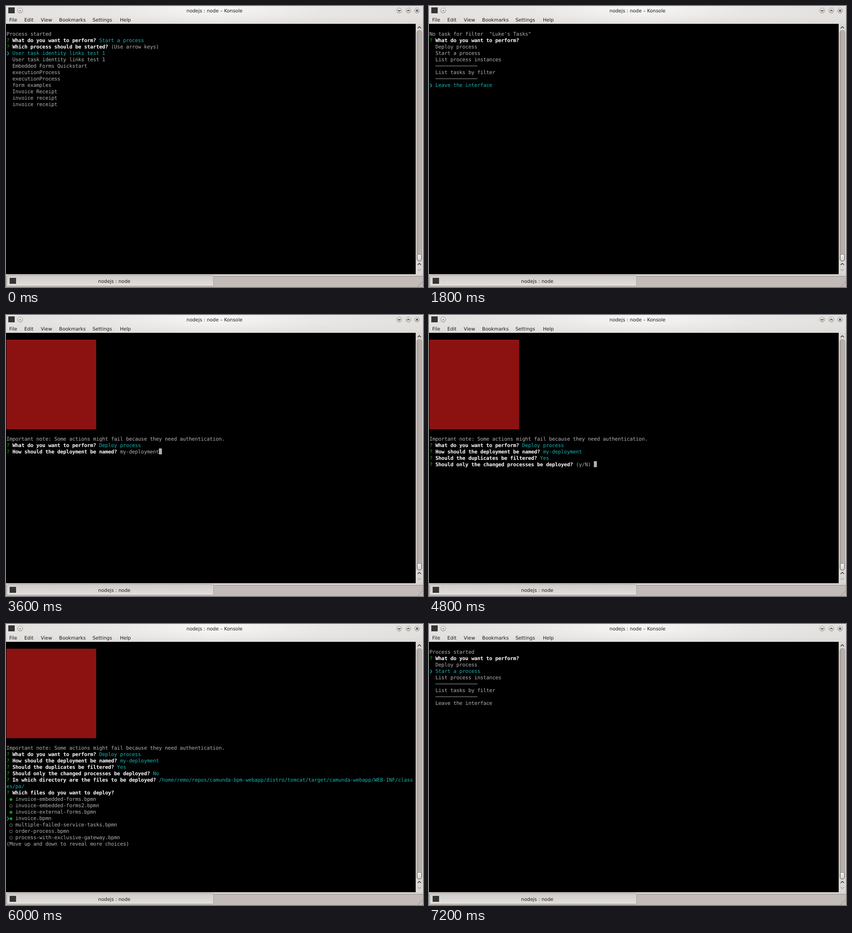
Animation of 911x615 px, one loop 7.8 s. Source, as an HTML page with a canvas:

```html
<!DOCTYPE html>
<html lang="en">
<head>
<meta charset="utf-8">
<title>Terminal session</title>
<style>
html, body { margin: 0; width: 100%; height: 100%; overflow: hidden; background: #000; }
canvas { display: block; }
</style>
</head>
<body>
<canvas id="stage" width="911" height="615"></canvas>
<script>
const ctx = document.getElementById('stage').getContext('2d');
const STEP = 600, CELL = 6.53, ROW = 14;
const GREY = '#b2b2b2', CYAN = '#18b2b2', GREEN = '#18b218', RED = '#8c1212', WHITE = '#fff';
const MONO = '11.2px "DejaVu Sans Mono", monospace';
const SANS = '10.4px "DejaVu Sans", sans-serif';

// A line is a list of [text, colour, bold] runs.
const plain = text => [[text, GREY]];
const ask = (question, answer = '', hint = '') =>
  [['? ', GREEN], [question + ' ', WHITE, true], [answer, CYAN], [hint, GREY]];
const choose = (items, picked) => items.map((item, i) =>
  i === picked ? [['❯ ' + item, CYAN]] : plain('  ' + item));
const check = (name, on, current) =>
  [[current ? '❯' : ' ', CYAN], [on ? '◉' : '○', on ? GREEN : GREY], [' ' + name, GREY]];

const RULE = '─'.repeat(14);
const actions = ['Deploy process', 'Start a process', 'List process instances', RULE,
  'List tasks by filter', RULE, 'Leave the interface'];
const processes = ['User task identity links test 1', 'User task identity links test 1',
  'Embedded Forms Quickstart', 'executionProcess', 'executionProcess', 'form examples',
  'Invoice Receipt', 'invoice receipt', 'invoice receipt'];
const filters = ['My Tasks', 'My Group Tasks', 'Accounting', "Luke's Tasks", "Anna's Tasks",
  "Simon's Tasks", 'All Tasks'];
const path = '/home/remo/repos/camunda-bpm-webapp/distro/tomcat/target/camunda-webapp/WEB-INF/classes/pa/';

const perform = answer => ask('What do you want to perform?', answer);
const started = plain('Process started');
const noTask = plain(`No task for filter  "Luke's Tasks"`);
const whichProcess = 'Which process should be started?';
const whichFilter = ask('For which filter do you want the tasks?');
const named = 'How should the deployment be named?';
const duplicates = 'Should the duplicates be filtered?';
const changed = 'Should only the changed processes be deployed?';
const directory = 'In which directory are the files to be deployed?';

const page = (...lines) => ({ lines: [[], ...lines] });
const deploy = (...lines) => ({
  logo: true,
  lines: [...Array(16).fill([]),
    plain('Important note: Some actions might fail because they need authentication.'), ...lines]
});
const typing = screen => ({ ...screen, cursor: true });

const deploying = perform('Deploy process');
const answers = [deploying, ask(named, 'my-deployment'), ask(duplicates, 'Yes'), ask(changed, 'No')];

const screens = [
  page(started, perform('Start a process'), ask(whichProcess, '', '(Use arrow keys)'),
    ...choose(processes, 0)),
  page(started, perform('List tasks by filter'), whichFilter, ...choose(filters, 3)),
  page(noTask, perform('List tasks by filter'), whichFilter, ...choose(filters, 6)),
  page(noTask, perform(), ...choose(actions, 6)),
  typing({ shell: true,
    lines: [plain('remo@remo-linux:~/repos/camunda-bpm-examples/sdk-js/nodejs$ node index.js ')] }),
  deploy(perform(), ...choose(actions, 0)),
  typing(deploy(deploying, ask(named, '', 'my-deployment'))),
  typing(deploy(...answers.slice(0, 2), ask(duplicates, '', '(Y/n) '))),
  typing(deploy(...answers.slice(0, 3), ask(changed, '', '(y/N) '))),
  typing(deploy(...answers, ask(directory, '', path.slice(0, 85)), plain(path.slice(85)))),
  deploy(...answers, ask(directory, path.slice(0, 85)), [[path.slice(85), CYAN]],
    ask('Which files do you want to deploy?'),
    check('invoice-embedded-forms.bpmn', true),
    check('invoice-embedded-forms2.bpmn'),
    check('invoice-external-forms.bpmn', true),
    check('invoice.bpmn', true, true),
    check('multiple-failed-service-tasks.bpmn'),
    check('order-process.bpmn'),
    check('process-with-exclusive-gateway.bpmn'),
    plain('(Move up and down to reveal more choices)')),
  page(started, perform('Start a process'), ask(whichProcess), ...choose(processes, 6)),
  page(started, perform(), ...choose(actions, 1))
];

function rect(x, y, w, h, fill) {
  ctx.fillStyle = fill;
  ctx.fillRect(x, y, w, h);
}

function box(x, y, w, h, r, fill, stroke) {
  ctx.beginPath();
  ctx.roundRect(x, y, w, h, r);
  ctx.fillStyle = fill;
  ctx.fill();
  ctx.strokeStyle = stroke;
  ctx.lineWidth = 1;
  ctx.stroke();
}

function line(colour, width, ...points) {
  ctx.beginPath();
  for (const [x, y] of points) ctx.lineTo(x, y);
  ctx.strokeStyle = colour;
  ctx.lineWidth = width;
  ctx.stroke();
}

function fade(x0, y0, x1, y1, ...colours) {
  const g = ctx.createLinearGradient(x0, y0, x1, y1);
  colours.forEach((c, i) => g.addColorStop(i / (colours.length - 1), c));
  return g;
}

const chevron = (x, y, dy, size, colour) =>
  line(colour, 1.3, [x - size, y - dy], [x, y + dy], [x + size, y - dy]);

function label(text, x, y, align = 'left') {
  ctx.font = SANS;
  ctx.textAlign = align;
  ctx.fillStyle = '#1d1b1a';
  ctx.fillText(text, x, y);
}

function button(x) {
  box(x - 5.5, 4.5, 11, 11, 5.5, fade(0, 4, 0, 16, '#f6f5f4', '#c9c5c2'), '#9d9895');
}

function drawWindow(program) {
  rect(0, 0, 911, 615, '#dedbd8');
  rect(0, 0, 911, 40, fade(0, 0, 911, 0, '#d8d5d2', '#e2e0de', '#f6f5f5', '#e2e0de', '#d8d5d2'));
  rect(0, 0, 911, 40, fade(0, 0, 0, 40, '#ffffff30', '#dedbd8c0'));
  rect(0, 0, 911, 1, '#f4f3f2');
  rect(5, 3, 14, 13, '#343434');
  button(31);
  rect(30, 9, 2, 2, '#77716e');
  [859, 879, 898].forEach(button);
  chevron(859, 10, 1.3, 2.7, '#3b3836');
  chevron(879, 10, -1.3, 2.7, '#3b3836');
  line('#3b3836', 1.3, [895.7, 7.7], [900.3, 12.3]);
  line('#3b3836', 1.3, [900.3, 7.7], [895.7, 12.3]);
  label(`nodejs : ${program} – Konsole`, 455.5, 14, 'center');
  [['File', 7], ['Edit', 40], ['View', 76], ['Bookmarks', 116], ['Settings', 189], ['Help', 249]]
    .forEach(([name, x]) => label(name, x, 34));

  // Scroll bar
  rect(895, 39, 16, 549, '#d9d6d3');
  box(897.5, 53.5, 11, 505, 5, fade(897, 0, 909, 0, '#a8a19d', '#b5aeaa', '#b8b1ad'), '#a09995');
  box(898.5, 543.5, 9, 14, 3, fade(0, 543, 0, 558, '#f3f2f1', '#d5d1ce'), '#77716d');
  chevron(903, 47, -1.8, 3.7, '#2b2927');
  chevron(903, 565, -1.8, 3.7, '#2b2927');
  chevron(903, 577.5, 1.8, 3.7, '#aaa4a0');

  // Tab bar
  rect(0, 587, 911, 28, '#c2bbb7');
  rect(0, 587, 911, 4, '#d6d2cf');
  rect(454, 591, 457, 1, '#948d89');
  box(1.5, 589.5, 452, 23, 3, fade(0, 589, 0, 613, '#d0cbc8', '#e2dfdd'), '#a39d99');
  line('#f3f1f0', 1, [4, 611.5], [452, 611.5]);
  rect(8, 595, 14, 13, '#343434');
  label(`nodejs : ${program}`, 236.5, 606, 'center');
  line('#8f8885', 1, [899, 615], [911, 603]);
}

function drawTerminal({ lines, logo, cursor }) {
  rect(0, 39, 895, 548, '#000');
  if (logo) rect(1, 54, 196, 196, RED);
  ctx.textAlign = 'left';
  let column;
  lines.forEach((runs, row) => {
    column = 0;
    for (const [text, colour, bold] of runs) {
      ctx.font = (bold ? 'bold ' : '') + MONO;
      ctx.fillStyle = colour;
      for (const char of text) ctx.fillText(char, 1 + CELL * column++, 51 + ROW * row);
    }
  });
  if (cursor) rect(1 + CELL * column, 26 + ROW * lines.length, CELL, 13, GREY);
}

function draw(now) {
  const screen = screens[Math.floor(now / STEP) % screens.length];
  ctx.textRendering = 'geometricPrecision';
  drawWindow(screen.shell ? 'bash' : 'node');
  drawTerminal(screen);
  requestAnimationFrame(draw);
}
requestAnimationFrame(draw);
</script>
</body>
</html>
```
